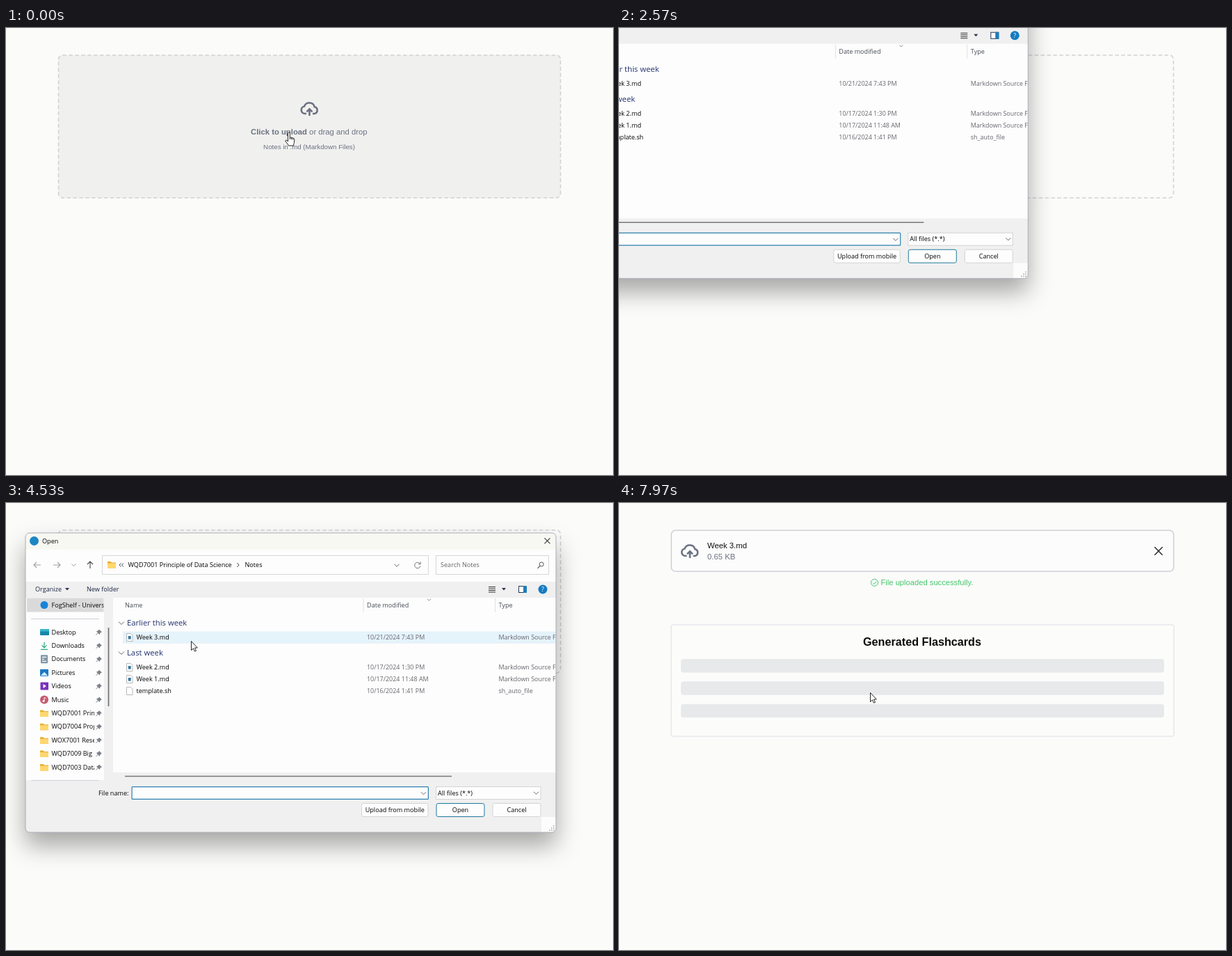
Recreate the animation shown at these times as an HTML page. Size 873 by 642 pixels, loop 8000 ms.

```html
<!DOCTYPE html>
<html lang="en">
<head>
<meta charset="utf-8">
<title>Upload notes</title>
<style>
  html, body { margin: 0; width: 100%; height: 100%; overflow: hidden; background: #fbfbfa; }
  svg { display: block; width: 873px; height: 642px; }
  text { white-space: pre; }
  .page text { font: 11.3px "Liberation Sans", Arial, sans-serif; fill: #6b7280; }
  .dialog text { font: 9.1px "Open Sans", "Noto Sans", sans-serif; fill: #050505; }
  .dialog .group { font-size: 11.3px; fill: #24336f; }
  .dialog .soft { fill: #686868; }
  .dialog .date { font-size: 8.95px; fill: #68646c; }
  .dialog .head { fill: #454b54; }
  .dialog .tool { fill: #1b2642; }
  .page .bold { font-weight: bold; }
  .page .small { font-size: 9.73px; }
  .page .dark { fill: #111; }
  .page .title { font-size: 16.2px; font-weight: bold; fill: #0c0c0c; }
  .page .ok { font-size: 11.2px; fill: #43c76b; }
  .window { filter: drop-shadow(0 19px 17px rgba(0, 0, 0, .34)); }
</style>
</head>
<body>
<svg id="stage" viewBox="0 0 873 642">
  <defs>
    <clipPath id="frame"><rect x="35" y="38" width="763" height="430" rx="6"/></clipPath>
    <clipPath id="side"><rect x="37" y="131" width="110.5" height="22"/></clipPath>
    <clipPath id="names"><rect x="37" y="160" width="97" height="232"/></clipPath>
  </defs>
</svg>
<script>
const LOOP = 8000;
const OPEN_AT = 600, PICK_AT = 4750, PRESS_AT = 5650, CLOSE_AT = 5740;
const stage = document.getElementById('stage');

function add(parent, tag, attrs = {}, content) {
  const node = document.createElementNS('http://www.w3.org/2000/svg', tag);
  for (const key in attrs) node.setAttribute(key, attrs[key]);
  if (content !== undefined) node.textContent = content;
  return parent.appendChild(node);
}
const group = (parent, attrs) => add(parent, 'g', attrs);
// Boxes take their outer edges; strokes are drawn inside them.
function box(parent, x1, y1, x2, y2, fill, stroke, rx = 0, width = 1) {
  const inset = stroke ? width / 2 : 0;
  return add(parent, 'rect', {
    x: x1 + inset, y: y1 + inset, width: x2 - x1 - 2 * inset, height: y2 - y1 - 2 * inset,
    rx, fill, stroke: stroke || 'none', 'stroke-width': width
  });
}
const line = (parent, d, stroke, width = 1) =>
  add(parent, 'path', { d, stroke, 'stroke-width': width, fill: 'none' });
const shape = (parent, d, fill) => add(parent, 'path', { d, fill });
const dot = (parent, cx, cy, r, fill) => add(parent, 'circle', { cx, cy, r, fill });
// y is the vertical middle of the line of text.
function label(parent, x, y, str, cls = '', size = 9.1, anchor = 'start') {
  return add(parent, 'text', { x, y: y + size * .35, class: cls, 'text-anchor': anchor }, str);
}
const chevron = (parent, x, y, color = '#666', r = 3.5) =>
  line(parent, `M${x - r} ${y - r / 2}l${r} ${r}l${r} ${-r}`, color);
const caretDown = (parent, x, y) => shape(parent, `M${x - 3} ${y - 1.5}h6l-3 3.5z`, '#27324e');
const cross = (parent, x, y, r, color, width) =>
  line(parent, `M${x - r} ${y - r}l${2 * r} ${2 * r}m0 ${-2 * r}l${-2 * r} ${2 * r}`, color, width);
function cloud(parent, x, y) {
  const g = group(parent, { transform: `translate(${x} ${y})` });
  line(g, 'M-4.5 7.5H-6.5A5.3 5.3 0 0 1-7.5-3A7.8 7.8 0 0 1 7.3-2.2A5 5 0 0 1 7.5 7.5H4.5' +
    'M0 10.5V1M-4 4.8L0 .8L4 4.8', '#6b7280', 2.6);
}
function folder(parent, x, y) {
  shape(parent, `M${x - 6} ${y - 4.5}h4.5l1.5 1.5h6v8h-12z`, '#e6ad35');
  box(parent, x - 6, y - 2, x + 6, y + 5, '#ffd76d', null, 1);
}
function sheet(parent, x, y, mark) {
  add(parent, 'path', { d: `M${x - 4} ${y - 5.5}h6l2.5 2.5v8.5h-8.5z`, fill: '#fff', stroke: '#b0b0b0', 'stroke-width': .9 });
  if (mark) box(parent, x - 1.8, y - 2, x + 2.2, y + 2.6, '#39789f');
}
function pin(parent, x, y) {
  shape(parent, `M${x} ${y - 4}l4 4l-2 .6l-1.5 3l-4.6-4.6l3-1.4z`, '#7c8288');
  line(parent, `M${x - 1.5} ${y + 1}l-3 3`, '#7c8288');
}

// Page
const page = group(stage, { class: 'page' });
const zone = group(page);
const zoneBox = add(zone, 'rect', {
  x: 75.5, y: 39, width: 722, height: 205, rx: 6,
  stroke: '#d1d3d4', 'stroke-width': 1.6, 'stroke-dasharray': '5.6 3.3'
});
cloud(zone, 436.5, 115.5);
const prompt = label(zone, 352, 149.5, '', '', 11.3);
add(prompt, 'tspan', { class: 'bold' }, 'Click to upload');
add(prompt, 'tspan', {}, ' or drag and drop');
label(zone, 436, 170.5, 'Notes in .md (Markdown Files)', 'small', 9.7, 'middle');

const file = group(page);
box(file, 74.5, 38.5, 798.5, 99, '#fcfcfc', '#cfd1d8', 6, 1.6);
cloud(file, 102, 68.5);
label(file, 127, 61, 'Week 3.md', 'dark', 11.3);
label(file, 127, 77, '0.65 KB', '', 11.3);
cross(file, 776, 69, 5.7, '#222', 1.4);

const success = group(page);
add(success, 'circle', { cx: 367.5, cy: 114.3, r: 5, fill: 'none', stroke: '#43c76b' });
line(success, 'M365 114.5l2 2l3.3-4', '#43c76b');
label(success, 376.5, 114.3, 'File uploaded successfully.', 'ok', 11.2);

const cards = group(page);
box(cards, 74.5, 174.5, 798.5, 335.5, '#fcfcfb', '#dedee8', 2);
label(cards, 436, 199.5, 'Generated Flashcards', 'title', 16.2, 'middle');
for (const y of [224, 256.3, 288.7]) box(cards, 89, y, 784, y + 19.5, '#e7e9eb', null, 4);

// Dialog
const dialog = group(stage, { class: 'dialog' });
add(dialog, 'rect', { x: 35, y: 38, width: 763, height: 430, rx: 6, fill: '#f0f0f0', class: 'window' });
const win = group(dialog, { 'clip-path': 'url(#frame)' });
box(win, 35, 38, 798, 62, '#f8f8f3');
box(win, 35, 62, 798, 108, '#fdfdfd');
box(win, 35, 131, 148, 393, '#fdfdfd');
box(win, 161, 131, 798, 382, '#fdfdfd');
box(win, 777, 446, 798, 468, '#fcfcfc');

const appIcon = dot(win, 47.5, 49.5, 6.5, '#1c86c4');
const caption = label(win, 59, 49.8, 'Open');
cross(win, 785.5, 49.3, 4, '#333', 1.1);

line(win, 'M57 84h-10m4-4l-4 4l4 4M75 84h10m-4-4l4 4l-4 4', '#a0a0a4', 1.1);
chevron(win, 104.5, 84, '#999', 3);
line(win, 'M128 89v-10m-4 4l4-4l4 4', '#444', 1.1);
box(win, 145, 70, 615, 98, '#fdfdfd', '#d7d7db');
box(win, 625, 70, 788, 98, '#fdfdfd', '#d7d7db');
folder(win, 159, 83.5);
line(win, 'M172.5 81.5l-2.5 2.5l2.5 2.5m3.5-5l-2.5 2.5l2.5 2.5M339.5 81l2.5 3l-2.5 3', '#444');
label(win, 182.5, 84, 'WQD7001 Principle of Data Science');
label(win, 350.5, 84, 'Notes');
chevron(win, 569, 84.5);
line(win, 'M602.5 82.3a4.2 4.2 0 1 0 .5 3.2M603.2 79.5v3.2h-3.2', '#777');
label(win, 632, 84, 'Search Notes', 'soft');
add(win, 'circle', { cx: 777.2, cy: 83, r: 3, fill: 'none', stroke: '#555' });
line(win, 'M775 85.3l-3.5 3.5', '#555', 1.2);

label(win, 49, 119, 'Organize', 'tool');
caretDown(win, 95, 118.5);
label(win, 123, 119, 'New folder', 'tool');
line(win, 'M701 115.5h10m-10 2.5h10m-10 2.5h10m-10 2.5h10', '#333');
caretDown(win, 723, 118.5);
box(win, 744, 114, 756, 124, '#fff', '#22374f');
box(win, 751, 114, 756, 124, '#1d7cbd');
dot(win, 779, 119, 6.5, '#137bc2');
label(win, 779, 119, '?', '', 9.1, 'middle').style.fill = '#fff';

box(win, 37, 131.5, 147.5, 151.5, '#dadada');
dot(win, 62, 141.5, 5.5, '#1683d8');
label(group(win, { 'clip-path': 'url(#side)' }), 72.5, 141.5, 'FogShelf - University');
line(win, 'M43 161.5H141M43 393.5H141', '#cfcfd8');
line(win, 'M154.5 174V287', '#6c6c6c', 1.6);

const names = group(win, { 'clip-path': 'url(#names)' });
const places = ['Desktop', 'Downloads', 'Documents', 'Pictures', 'Videos', 'Music',
  'WQD7001 Principle', 'WQD7004 Programming', 'WOX7001 Research', 'WQD7009 Big Data', 'WQD7003 Data'];
const placeIcons = [
  y => { box(win, 56, y - 4.5, 69, y + 4.5, '#1488a8', null, 1); box(win, 56, y - 4.5, 69, y - 1, '#36b5cf', null, 1); },
  y => line(win, `M62 ${y - 5}v8m-3.5-3.5l3.5 3.5l3.5-3.5M57 ${y + 5.5}h10`, '#2aa581', 1.2),
  y => { box(win, 57, y - 6, 67, y + 6, '#8297a8', null, 1); line(win, `M59 ${y - 3}h6m-6 3h3m-3 3h6`, '#fff', 1.2); },
  y => { box(win, 56, y - 5, 68, y + 5, '#1b77c5', null, 1); shape(win, `M57 ${y + 4}l5-5l5 5z`, '#d9effd'); },
  y => { box(win, 56.5, y - 5.5, 68, y + 5.5, '#7a31bd', null, 1); shape(win, `M60.5 ${y - 3}v6l4.5-3z`, '#fff'); },
  y => { dot(win, 62, y, 6, '#c85a6d'); line(win, `M62 ${y + 2}v-5l2.5 1`, '#fff'); dot(win, 61, y + 2, 1.5, '#fff'); }
];
places.forEach((name, i) => {
  const y = 180.5 + 19.4 * i;
  placeIcons[i] ? placeIcons[i](y) : folder(win, 62, y);
  label(names, 72.5, y, name);
  pin(win, 141, y);
});

line(win, 'M521 132V152M710.5 132V152', '#e0e0e4');
chevron(win, 615.5, 134, '#888', 2.5);
[[178, 'Name'], [526, 'Date modified'], [715.5, 'Type']].forEach(([x, s]) => label(win, x, 142.3, s, 'head'));
const row = box(win, 175, 179.5, 798, 196.8, '#e5f3fb');
[[167, 'Earlier this week'], [210, 'Last week']].forEach(([y, s]) => {
  chevron(win, 173, y + .5, '#666', 4);
  label(win, 181, y, s, 'group', 11.3);
});
[
  [188, 'Week 3.md', '10/21/2024 7:43 PM'],
  [231, 'Week 2.md', '10/17/2024 1:30 PM'],
  [248, 'Week 1.md', '10/17/2024 11:48 AM'],
  [265, 'template.sh', '10/16/2024 1:41 PM']
].forEach(([y, name, date]) => {
  const notes = name.endsWith('.md');
  sheet(win, 184.5, y, notes);
  label(win, 194.5, y, name);
  label(win, 526, y, date, 'date');
  label(win, 715.5, y, notes ? 'Markdown Source File' : 'sh_auto_file', 'date');
});
line(win, 'M178 387.5H648', '#77777c', 1.6);

label(win, 183.5, 411.5, 'File name:', '', 9.1, 'end');
box(win, 187.5, 402, 615, 421, '#fdfdfd', '#2f7fae', 1, 1.2);
const marked = box(win, 190, 405, 238, 417.5, '#0f78d0');
const chosen = label(win, 190.5, 411.5, 'Week 3.md');
const caret = line(win, 'M191.5 405V418', '#111');
chevron(win, 607.5, 412);
box(win, 625, 402, 776.5, 421, '#fdfdfd', '#d3d3d8');
label(win, 628, 411.5, 'All files (*.*)');
chevron(win, 769.5, 411.5);
function button(x1, x2, str, stroke) {
  const face = box(win, x1, 426, x2, 446, '#fdfdfd', stroke, 2.5);
  label(win, (x1 + x2) / 2, 436, str, '', 9.1, 'middle');
  return face;
}
button(518, 614.5, 'Upload from mobile', '#d3d3d5');
const openButton = button(625.5, 695.5, 'Open', '#20789c');
button(706.5, 776.5, 'Cancel', '#d3d3d5');
for (let i = 0; i < 3; i++)
  for (let j = 0; j <= i; j++) box(win, 794 - 3 * j, 458 + 3 * i, 795.4 - 3 * j, 459.4 + 3 * i, '#999');
box(dialog, 34.5, 37.5, 798.5, 468.5, 'none', '#adadb8', 6);

// Pointers, both with their tip at 0,0
const pointer = group(stage, { fill: '#fff', stroke: '#111', 'stroke-linejoin': 'round' });
const arrow = add(pointer, 'path', { d: 'M.5.5V13.5L3.4 10.8L5.5 15.2L7.5 14.2L5.5 10H9.3Z', 'stroke-width': .9 });
const hand = add(pointer, 'path', {
  d: 'M-1.5 11V1.4a1.4 1.4 0 0 1 2.8 0V7l5 1.2q1.6.5 1.5 2.2l-.4 4.2q-.3 1.5-1.1 4.4H-.6' +
    'Q-1.8 16.2-4.8 13q-.9-1.7.6-2q1.1.1 2.7 2zM1.3 7v3M3.6 7.6v2.8M5.8 8.2v2.4', 'stroke-width': .9
});

// Steps: time, x, y
const dragSteps = [[0, -362, -176], [2230, -362, -176], [2500, -250, -128], [2870, -40, -25],
  [3300, 0, 0], [3330, 2, 5], [3450, -7, 5]];
const pointerSteps = [[0, 407, 150], [900, 407, 150], [1500, 180, -30], [2230, 62, -128]];
const laterSteps = [[3450, 417, 53], [3800, 417, 53], [4530, 266, 198], [PICK_AT, 250, 195],
  [4900, 250, 195], [5500, 646.5, 448], [6000, 646.5, 448], [6550, 438, 156], [7530, 436, 156],
  [7940, 361, 272]];

const clamp = v => Math.min(1, Math.max(0, v));
const smooth = v => v * v * (3 - 2 * v);
function track(steps, t, ease = v => v) {
  const i = steps.findIndex(s => s[0] > t);
  if (i < 0) return steps[steps.length - 1].slice(1);
  const [t0, x0, y0] = steps[i - 1], [t1, x1, y1] = steps[i];
  const k = ease((t - t0) / (t1 - t0));
  return [x0 + (x1 - x0) * k, y0 + (y1 - y0) * k];
}
const show = (node, on) => node.setAttribute('visibility', on ? 'inherit' : 'hidden');

function draw(t) {
  show(zone, t < 6050);
  zoneBox.setAttribute('fill', t < 2500 ? '#f0f0ef' : '#fbfbfa');
  show(file, t >= 6050);
  show(success, t >= 6300);
  show(cards, t >= 7600);

  // The window shrinks and drifts a little to the upper left as it fades away.
  const [dx, dy] = track(dragSteps, t);
  const leaving = clamp((t - CLOSE_AT) / 190);
  const opacity = clamp((t - OPEN_AT) / 200) * (1 - leaving);
  const scale = .932 + .068 * opacity;
  const cx = 416.5 + dx - 4.5 * leaving, cy = 253 + dy - 2.5 * leaving;
  dialog.setAttribute('opacity', opacity);
  show(dialog, opacity > 0);
  dialog.setAttribute('transform', `translate(${cx} ${cy}) scale(${scale}) translate(-416.5 -253)`);
  show(appIcon, !leaving);
  caption.setAttribute('x', leaving ? 42 : 59);

  const dragging = t >= 2230 && t < 3450;
  const [px, py] = dragging ? [424 + dx, 48 + dy]
    : track(t < 2230 ? pointerSteps : laterSteps, t, smooth);
  pointer.setAttribute('transform', `translate(${px} ${py})`);
  show(hand, t < OPEN_AT);
  show(arrow, t >= OPEN_AT);

  const picked = t >= PICK_AT, pressed = t >= PRESS_AT;
  const over = t > 3450 && py - dy > 179 && py - dy < 197;
  show(row, picked || over);
  row.setAttribute('fill', pressed ? '#cfcfcf' : picked ? '#cce8ff' : '#e5f3fb');
  show(marked, pressed);
  show(chosen, picked);
  chosen.style.fill = pressed ? '#fff' : '';
  show(caret, !picked && Math.floor((t + 360) / 530) % 2 === 0);
  openButton.setAttribute('fill', t > 5400 ? '#cfe8f8' : '#fdfdfd');
}

const start = performance.now();
function tick() {
  draw((performance.now() - start) % LOOP);
  requestAnimationFrame(tick);
}
draw(0);
requestAnimationFrame(tick);
</script>
</body>
</html>
```
